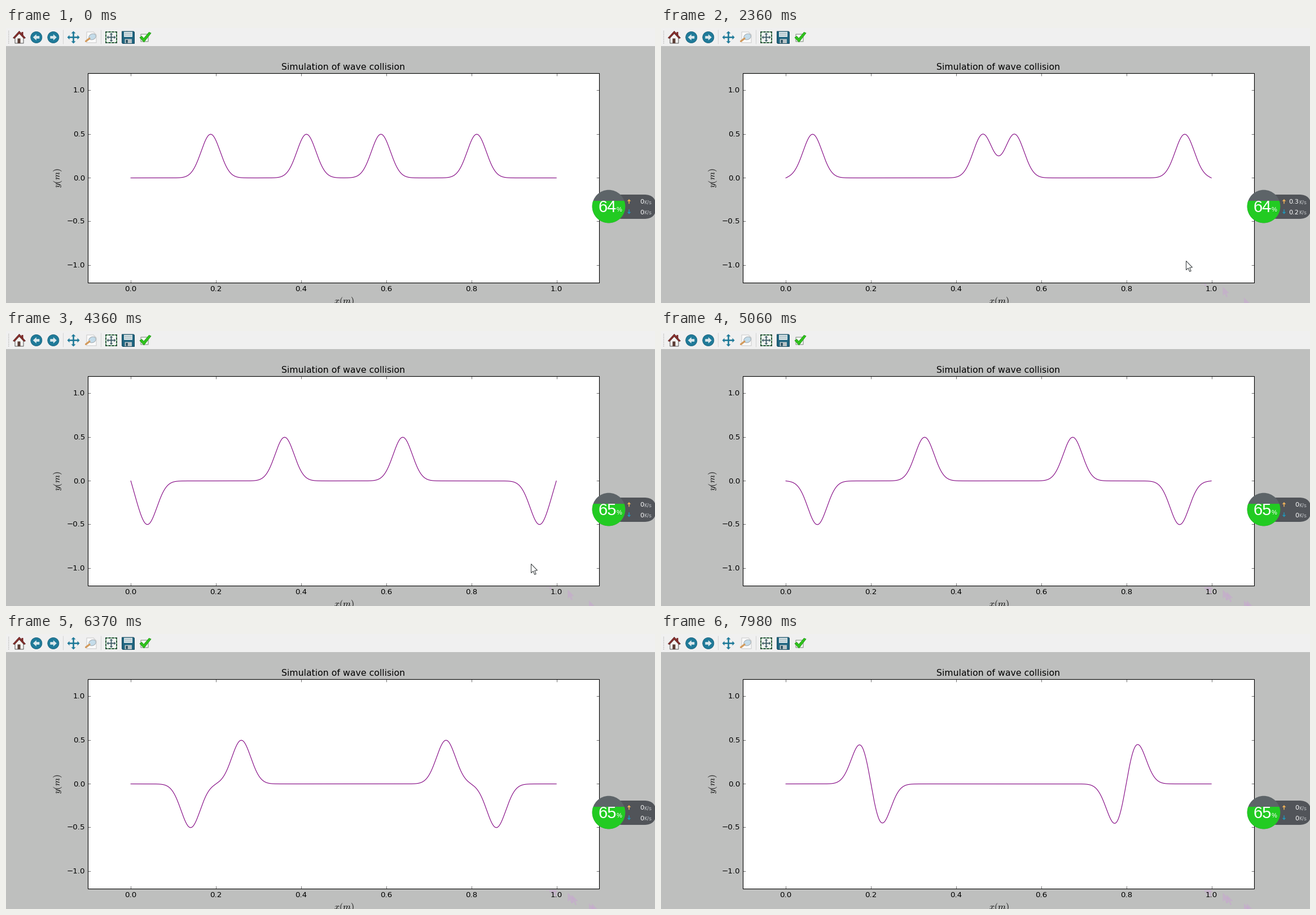
A matplotlib script that plays this animation: 1150x487 px, repeating every 8.06 s.

```python
import numpy as np
import matplotlib.pyplot as plt
from matplotlib.animation import FuncAnimation
from matplotlib.patches import Circle, Ellipse, FancyBboxPatch, Polygon, Rectangle

W, H, DPI = 1150, 487, 100
LOOP, TICK = 8060, 20  # ms
STEPS = 105            # simulation steps in one loop
PT = 72 / DPI          # points per pixel

plt.rcParams["font.family"] = "DejaVu Sans"
plt.rcParams["mathtext.fontset"] = "cm"
plt.rcParams["path.snap"] = False

GREY, BAR, TEAL, INK = "#bebfbe", "#f0f0f0", "#1f7a99", "#2f3436"

fig = plt.figure(figsize=(W / DPI, H / DPI), dpi=DPI, facecolor=GREY)
ax = fig.add_axes([0, 0, 1, 1])
ax.set_xlim(0, W)
ax.set_ylim(H, 0)
ax.axis("off")


def fill(patch, color, edge="none", lw=0, **kw):
    patch.set(facecolor=color, edgecolor=edge, linewidth=lw * PT, **kw)
    return ax.add_patch(patch)


def rect(x, y, w, h, color, edge="none", lw=0):
    return fill(Rectangle((x, y), w, h), color, edge, lw)


def poly(points, color, edge="none", lw=0, **kw):
    return fill(Polygon(points, closed=True), color, edge, lw, **kw)


def line(xs, ys, color, lw, **kw):
    return ax.plot(xs, ys, color=color, lw=lw * PT, **kw)[0]


def label(x, y, s, size, color="black", ha="center", va="baseline", **kw):
    return ax.text(x, y, s, fontsize=size * PT, color=color, ha=ha, va=va, **kw)


# ---- toolbar ----
def home():
    rect(27.5, 7, 3, 6, "#7d2a2a")
    poly([(16, 17), (23.5, 9), (31, 17), (31, 27), (16, 27)], "#f4f4f2", "#555555", 1)
    rect(20.5, 18.5, 5, 8.5, "#5a3c34")
    poly([(12.5, 17.5), (23.5, 5.5), (34.5, 17.5), (32, 18.5), (23.5, 9.7), (15, 18.5)],
         "#8e2f2c", "#4d1a1a", 0.7)


def round_arrow(cx, way):
    fill(Circle((cx, 16.5), 10), TEAL, "#17607a", 0.8)
    pts = [(-6, 0), (0, -5.5), (0, -2.3), (5.5, -2.3), (5.5, 2.3), (0, 2.3), (0, 5.5)]
    poly([(cx + way * x, 16.5 + y) for x, y in pts], "#dbe8ec")


def cross_arrows(cx, cy, r, head, width, color):
    for dx, dy in ((1, 0), (-1, 0), (0, 1), (0, -1)):
        bx, by = cx + dx * (r - head), cy + dy * (r - head)
        line([cx, bx], [cy, by], color, width)
        poly([(cx + dx * r, cy + dy * r), (bx + dy * head, by + dx * head),
              (bx - dy * head, by - dx * head)], color)


def zoom():
    poly([(143, 7), (155, 7), (160, 12), (160, 26), (143, 26)], "#fafafa", "#c9c9c9", 1)
    line([141.5, 148], [23.5, 18.5], "#d39a5c", 3.2, solid_capstyle="round")
    fill(Ellipse((153, 15.5), 13, 10, angle=-25), "#c4dcea", "#a3abb0", 1)


def layout():
    rect(177, 7, 19, 19, "#f4f6f4", "#2c4f3c", 2)
    for k in (180.5, 186.5, 192.5):
        for x, y in ((k, 7), (k, 26), (177, k - 170), (196, k - 170)):
            rect(x - 1, y - 1, 2, 2, "#8fd09a")
    cross_arrows(186.5, 16.5, 8, 3, 1.8, "#3f5d66")


def floppy():
    poly([(205.5, 6), (226, 6), (227.5, 7.5), (227.5, 27.5), (207, 27.5), (205.5, 26)],
         "#1f6580", "#174a5e", 1)
    rect(209, 6.8, 15, 9, "#dfe9ec")
    for y in (9.5, 12.5):
        line([210.5, 222.5], [y, y], "#8aa5ae", 1)
    rect(210.5, 19.5, 12.5, 7.5, "#b9c3c6")
    rect(212.5, 21, 3.2, 5.5, "#1f4a5c")


def check():
    rect(239, 11, 13, 13, "#fbfbfb", "#8a968a", 1.2)
    poly([(237, 17), (240.5, 14.5), (244, 18.5), (253.5, 7.5), (257, 9), (244.5, 25)],
         "#2fc41c", "#1f9a12", 0.8)


def toolbar():
    rect(0, 0, W, 32, BAR)
    for y in range(5, 28, 3):
        rect(4, y, 1.4, 1.4, "#b4b4b4")
    for x in (101.5, 168.5):
        line([x, x], [4, 28], "#d4d4d4", 1)
    home()
    round_arrow(53.8, 1)
    round_arrow(83.8, -1)
    cross_arrows(119.5, 16.5, 11, 4, 2.6, TEAL)
    zoom()
    layout()
    floppy()
    check()


# ---- plot ----
def to_x(v):
    return 221.2 + 754.3 * v


def to_y(v):
    return 265.5 - 154.7 * v


def plot_frame():
    left, right, top, bottom = 145.5, 1051.5, 80.5, 451.5
    rect(left, top, right - left, bottom - top, "white", "black", 1.1)
    for v in np.arange(6) / 5:
        x = round(to_x(v)) + 0.5
        for a, b in ((top, top + 4.5), (bottom, bottom - 4.5)):
            line([x, x], [a, b], "black", 0.56)
        label(to_x(v), 466, f"{v:.1f}", 13.33)
    for v in np.arange(-2, 3) / 2:
        y = int(to_y(v)) + 0.5
        for a, b in ((left, left + 4.5), (right, right - 4.5)):
            line([a, b], [y, y], "black", 0.56)
        label(140, y + 4, f"{v:.1f}".replace("-", "\u2212"), 13.33, ha="right")
    label(598, 73.5, "Simulation of wave collision", 15.7)
    label(599, 488, "$x(m)$", 16)
    label(91.5, 265.5, "$y(m)$", 16, va="center", rotation=90)


# ---- floating monitor ----
def monitor():
    fill(FancyBboxPatch((1070, 295), 82, 43, boxstyle="round,pad=0,rounding_size=21"),
         "#515459")
    fill(Circle((1068, 316), 29.3), "#5d6468")
    a = np.radians(np.linspace(-20, 200, 80))
    poly(np.c_[1068 + 29.3 * np.cos(a), 316 + 29.3 * np.sin(a)], "#22cb22")
    for cy, way, color in ((307, -1, "#f2b45a"), (325.5, 1, "#2196b8")):
        line([1104, 1104], [cy - 3.5 * way, cy + 2 * way], color, 1.5)
        poly([(1104, cy + 4 * way), (1100.7, cy + 0.3 * way), (1107.3, cy + 0.3 * way)], color)
    label(1082, 325, "%", 11, "white", "left", family="Liberation Sans")
    rows = (311, 329.5)
    for y in rows:
        label(1130.5, y, "K/s", 9.3, "#c0c3c6", "left")
    percent = label(1065.5, 326, "", 29, "white", family="Liberation Sans")
    rates = [label(1130.5, y, "", 11.2, "white", "right") for y in rows]
    return percent, rates


# ---- pointer ----
ARROW = np.array([(0, 0), (0, 16), (3.7, 12.6), (6.2, 18.8), (8.7, 17.7),
                  (6.2, 11.8), (11, 11.4)])
ENTER, LEAVE, GLIDE = 7, 61, 3


def glide(a, b, k):
    return np.array(a) + (np.array(b) - a) * k / (GLIDE - 1)


def pointer_at(step):
    """Tip of the pointer, or None while it is off the stage."""
    if step < ENTER or step >= LEAVE + GLIDE:
        return None
    if step < ENTER + GLIDE:
        return glide((1033, 477), (958, 439), step - ENTER)
    if step >= LEAVE:
        return glide((967, 446), (1038, 477), step - LEAVE)
    return np.array((932.5, 407.5) if step < 26 else (930.5, 412.5))


def trail():
    """Faint marks the moving pointer leaves on the grey border."""
    border = Rectangle((0, 452.5), W, 40, transform=ax.transData)
    marks = []
    for start in (ENTER, LEAVE):
        for step in range(start, start + GLIDE):
            m = poly(ARROW + pointer_at(step), "#cba0d6", alpha=0.45)
            m.set_clip_path(border)
            marks.append((step, m))
    return marks


toolbar()
plot_frame()
marks = trail()
percent, rates = monitor()
wave = line([], [], "#800080", 1.1, zorder=3)
pointer = poly(ARROW, "white", INK, 1, zorder=5)

# ---- motion ----
END = 0.9995
X = np.linspace(0, END, 800)


def pulse(c):
    return 0.5 * np.exp(-1000 * (X - c) ** 2)


def string_shape(step):
    """Four travelling pulses, inverted on reflection at both fixed ends."""
    shift = 0.00391 * step + 0.0034 * (1 - np.exp(-step / 3))
    y = np.zeros_like(X)
    for start in (0.3, 0.7):
        for way in (-1, 1):
            c = start + way * (0.1125 + shift)
            y += pulse(c) - pulse(-c) - pulse(2 * END - c)
    return y


def update(i):
    step = min(int((i * TICK + 26) * STEPS / LOOP), STEPS - 1)
    wave.set_data(to_x(X), to_y(string_shape(step)))

    spot = pointer_at(step)
    pointer.set_visible(spot is not None)
    if spot is not None:
        pointer.set_xy(ARROW + spot)
    for left_at, m in marks:
        m.set_visible(step > left_at)

    busy = 15 <= step < 41
    percent.set_text("64" if step < 41 else "65")
    for text, value in zip(rates, ("0.3", "0.2")):
        text.set_text(value if busy else "0")
    return [wave, pointer, percent, *rates]


anim = FuncAnimation(fig, update, frames=LOOP // TICK, interval=TICK,
                     init_func=lambda: update(0), repeat=True, repeat_delay=0,
                     cache_frame_data=False)
plt.show()
```
